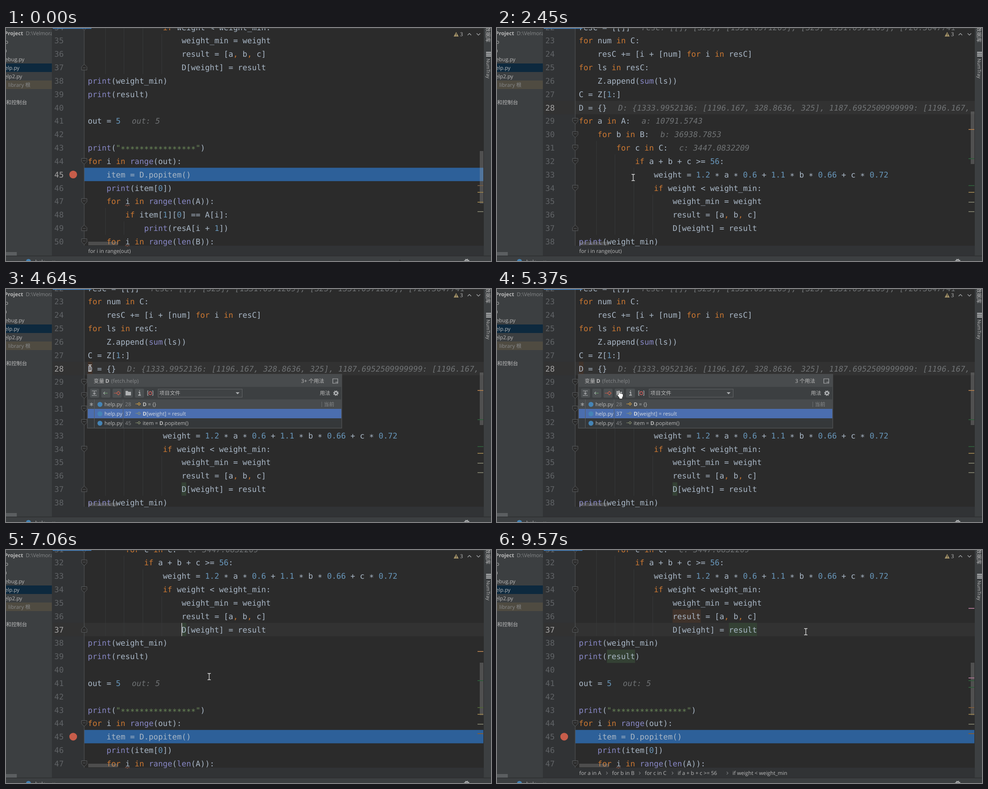
An HTML page that plays this animation: 1079 px wide and 519 px high, repeating every 9640 ms.

```html
<!DOCTYPE html>
<html lang="zh">
<head>
<meta charset="utf-8">
<title>Editor usages</title>
<style>
  html, body { margin: 0; width: 100%; height: 100%; overflow: hidden; background: #2b2b2b; }
  svg { display: block; width: 100vw; height: 100vh; }
  text { white-space: pre; text-rendering: geometricPrecision; }
  .code { font: 17.33px "DejaVu Sans Mono", monospace; fill: #a9b7c6; }
  .ui { font: 11.7px "Open Sans", "Noto Sans CJK SC", "Noto Sans CJK", sans-serif; fill: #bbbbbb; }
  .kw { fill: #cc7832; }
  .fn { fill: #8888c6; }
  .num { fill: #6897bb; }
  .str { fill: #6a8759; }
  .star { baseline-shift: -3px; }
  .hint { fill: #707375; font-style: italic; }
  .dim { fill: #87898b; }
  .on .ui { fill: #d4d8de; }
  .b { font-weight: 700; }
  .end { text-anchor: end; }
  .line { fill: none; stroke: #afb1b3; stroke-width: 1.2; }
</style>
</head>
<body>
<svg id="stage" viewBox="0 0 1079 519" preserveAspectRatio="none"></svg>
<script>
const LOOP = 9640, PITCH = 29.83, CHAR = 10.433, LEFT = 182;

const FIRST_LINE = 22;
const source = `resC = [[]]
for num in C:
    resC += [i + [num] for i in resC]
for ls in resC:
    Z.append(sum(ls))
C = Z[1:]
D = {}
for a in A:
    for b in B:
        for c in C:
            if a + b + c >= 56:
                weight = 1.2 * a * 0.6 + 1.1 * b * 0.66 + c * 0.72
                if weight < weight_min:
                    weight_min = weight
                    result = [a, b, c]
                    D[weight] = result
print(weight_min)
print(result)

out = 5

print("****************")
for i in range(out):
    item = D.popitem()
    print(item[0])
    for i in range(len(A)):
        if item[1][0] == A[i]:
            print(resA[i + 1])
    for i in range(len(B)):`.split('\n');

const hints = {
  22: 'resC: [[], [325], [1331.0971209], [325, 1331.0971209], [726.3647741',
  28: 'D: {1333.9952136: [1196.167, 328.8636, 325], 1187.6952509999999: [1196.167,',
  29: 'a: 10791.5743',
  30: 'b: 36938.7853',
  31: 'c: 3447.0832209',
  41: 'out: 5'
};
const foldStarts = [29, 30, 31, 32, 34, 44, 47, 50], foldEnds = [37, 49];

const rect = (x, y, w, h, fill, more = '') =>
  `<rect x="${x}" y="${y}" width="${w}" height="${h}" fill="${fill}" ${more}/>`;
const ui = (x, cy, str, cls = '') => `<text class="ui ${cls}" x="${x}" y="${cy + 4}">${str}</text>`;
const path = (d, more = '') => `<path class="line" d="${d}" ${more}/>`;
const during = (from, to, body) => `<g data-on="${from} ${to}">${body}</g>`;
const colX = col => LEFT + col * CHAR;
const baseline = mid => Math.round(mid + 6.4);
const indentOf = str => str.search(/\S|$/);
const dot = (x, y) => `<circle cx="${x}" cy="${y}" r="5.5" fill="#4584b6"/>`;
const gear = (x, y) =>
  `<circle cx="${x}" cy="${y}" r="3.4" fill="none" stroke="#afb1b3" stroke-width="2.6"/>
   <circle cx="${x}" cy="${y}" r="5.2" fill="none" stroke="#afb1b3" stroke-width="1.8" stroke-dasharray="2 2.08"/>`;

function paint(str) {
  const token = /("[^"]*")|\b(for|in|if)\b|\b(print|range|len|sum)\b|(\b\d+(?:\.\d+)?)|(,)/g;
  const classes = ['str', 'kw', 'fn', 'num', 'kw'];
  return str.replace(/</g, '&lt;')
    .replace(token, (all, ...groups) =>
      `<tspan class="${classes[groups.slice(0, 5).findIndex(Boolean)]}">${all}</tspan>`)
    .replace(/\*+/g, '<tspan class="star">$&</tspan>');
}

function fold(y, dir) {
  return `<path d="M168 ${y - 6 * dir}h12v${7 * dir}l-6 ${6 * dir}l-6 ${-6 * dir}z" fill="#2b2b2b" stroke="#5c5f61"/>
    <path d="M171 ${y - dir}h6" stroke="#5c5f61"/>`;
}

// A scrolled view of the code, with `top` as the first complete line.
function view(top, current, thumbY, under = '', over = '') {
  const mid = n => 28 + PITCH * (n - top);
  let rows = '', folds = '', text = '';
  if (current !== 45) rows += rect(104, mid(current) - 15, 959, 30, '#323232');
  if (top > 28) {
    rows += rect(174, mid(45) - 15, 888, 29.8, '#2d6099');
    folds += `<circle cx="149.5" cy="${mid(45)}" r="8.6" fill="#c75d4a"/>`;
  }
  for (let n = top - 1; n <= top + 15; n++) {
    const str = source[n - FIRST_LINE];
    if (str === undefined) continue;
    const y = mid(n), base = baseline(y), indent = indentOf(str);
    for (let c = 4; c < indent; c += 4)
      rows += rect(Math.round(colX(c)) - 3, y - 15, 1, 30, '#373839');
    text += `<text class="code" x="107.5" y="${base}" style="fill:${n === current ? '#a4a3a3' : '#606366'}">${n}</text>`;
    text += `<text class="code" x="${colX(indent)}" y="${base}">${paint(str.trim())}</text>`;
    if (hints[n]) text += `<text class="code hint" x="${colX(str.length) + 25}" y="${base}">${hints[n]}</text>`;
    if (n === 47 || n === 50)
      text += `<path d="M265 ${y + 10}l2.5 -2l2.5 3l2.5 -3l2.5 2" fill="none" stroke="#b3674f"/>`;
    if (foldStarts.includes(n)) folds += fold(y, 1);
    if (foldEnds.includes(n)) folds += fold(y, -1);
  }
  return `<g clip-path="url(#editor)">${rows}${under}${rect(173.5, 0, 1, 485, '#555759')}${folds}${over}</g>
    <g clip-path="url(#code)">${text}</g>` +
    rect(1054, thumbY, 8, 117, '#a6a6a6', 'opacity=".3"');
}

const mark = (top, n, col, len, color) =>
  rect(colX(col), 28 + PITCH * (n - top) - 15, len * CHAR, 29.8, color);
const caret = (col, k) => rect(colX(col) - .5, 28 + PITCH * k - 14.5, 1.6, 29, '#bbbbbb');
const ticks = list => list.map(([y, color]) => rect(1049, y - 1, 13, 2, color)).join('');

const READ = '#344134', WRITE = '#40332b';
const TAN = '#8f7a4c', GRAY = '#777766', GREEN = '#2f5a3a', ORANGE = '#a3764b', PINK = '#a4718c';

function sidebar() {
  return rect(0, 0, 102, 507, '#3c3f41') + rect(102, 0, 1, 507, '#323536') +
    rect(0, 79, 102, 19, '#0d293e') + rect(0, 117, 102, 19, '#4f4b41') +
    ui(38, 12, 'Project', 'b end') +
    `<g clip-path="url(#side)">${ui(44, 12, 'D:\\Velmora', 'dim')}</g>` +
    ui(5, 31, 'demo', 'end') + ui(2, 50, 'main', 'end') +
    ui(41, 70, 'debug.py', 'end') + ui(30, 89, 'help.py', 'end') + ui(36, 108, 'help2.py', 'end') +
    ui(5, 127, 'library 根', 'dim') + ui(47, 166, '临时文件和控制台', 'end') +
    rect(0, 499, 24, 8, '#5b5e60');
}

function frame() {
  const grid = [0, 4, 8].map(d => rect(1068, 53 + d, 11, 2.6, '#afb1b3')).join('');
  return rect(1063, 0, 16, 507, '#3c3f41') +
    `<text class="ui end" transform="translate(1068 32) rotate(90)">数据库</text>
     <text class="ui" style="font-size:10.4px" transform="translate(1068.5 68) rotate(90)">NumTray</text>` +
    grid + rect(103, 0, 960, 1, '#3c3f41') + rect(104, 0, 86, 1.6, '#4a88c7') +
    `<path d="M1001.5 9l5.5 10h-11z" fill="#a8966a"/>` +
    rect(1001, 12, 1.3, 3.5, '#2b2b2b') + rect(1001, 16.5, 1.3, 1.3, '#2b2b2b') +
    ui(1010, 14, '3') + path('M1027 16l4 -4l4 4M1047 12l4 4l4 -4', 'stroke-width="1.5"') +
    rect(183, 476, 66, 8, '#a6a6a6', 'opacity=".28"') +
    rect(0, 507, 1079, 12, '#3c3f41') + rect(0, 507, 1079, 1.3, '#2b2d2e') +
    dot(50, 520) + ui(65, 521, 'help') + ui(103, 521, '×') + gear(1025, 520);
}

function crumbs() {
  const parts = [[183, 'for a in A'], [256, 'for b in B'], [329, 'for c in C'],
    [402, 'if a + b + c >= 56'], [524, 'if weight &lt; weight_min']];
  return parts.map(([x, str], i) => ui(x, 497, str) +
    (i ? path(`M${x - 13} 494l3 3l-3 3`, 'style="stroke:#77797b"') : '')).join('');
}

function popup() {
  const button = (x, icon) => rect(x, 222, 20, 20, '#4c5052', 'rx="2"') + icon;
  const row = (i, line, str, color) => {
    const y = 257 + 21 * i;
    return `<g data-row="${i}">` + dot(209, y) + ui(219, y, 'help.py') + rect(260, y - 11, 1, 21, '#5a5d5f') +
      ui(265, y, line, 'dim') +
      path(`M288 ${y - 1}h5m0 0l3 -3l3 3l-3 3z`, `style="stroke:${color}"`) + ui(304, y, str) + '</g>';
  };
  return rect(181, 190, 566, 120, '#3c3f41', 'stroke="#585b5d"') +
    rect(182, 191, 564, 27, '#484b4d') +
    ui(195, 204.5, '变量') + ui(221, 204.5, 'D', 'b') + ui(234, 204.5, '(fetch.help)', 'dim') +
    during(0, 4700, ui(708, 204.5, '3+ 个用法', 'end')) +
    during(4700, LOOP, ui(708, 204.5, '3 个用法', 'end')) +
    path('M727 200h11v10h-11zM733 207.5h5') +
    button(187, path('M191 227h11M191 237h11M196.5 228v6m-3 -2.5l3 3l3 -3')) +
    button(212, path('M217 232h9', 'style="stroke:#6aa06a"') + path('M220 229l-3 3l3 3')) +
    button(237, path('M240 232h6m0 0l4 -4l4 4l-4 4z', 'style="stroke:#d0604c"')) +
    button(262, `<path d="M266 227h5l1 2h6v8h-12z" fill="#afb1b3"/>`) +
    button(287, path('M295 230h2.5v6.5M294 236.5h6M296.5 226.5h1.5', 'style="stroke-width:1.8"')) +
    path('M317 227h-2v10h2M325 227h2v10h-2') +
    `<circle cx="321" cy="232" r="3.4" fill="none" stroke="#c75d5d" stroke-width="1.6"/>` +
    rect(338.5, 223, 187, 18, '#3f4244', 'stroke="#646769"') + ui(341, 232, '项目文件') +
    `<path d="M511 230h8.5l-4.25 4.5z" fill="#afb1b3"/>` +
    ui(698, 232, '用法') + gear(734, 232) +
    rect(182, 246, 564, 63, '#35383a') + rect(182, 246, 564, 21, '#484b4d') +
    '<rect id="selected" x="182" y="267" width="564" height="21" fill="#4b6eaf"/>' +
    rect(196, 246, 1, 63, '#5a5d5f') +
    path('M190 253v8M186.5 255l7 4M193.5 255l-7 4') +
    row(0, 28, '<tspan class="b">D</tspan> = {}', '#d9a343') +
    row(1, 37, '<tspan class="b">D</tspan>[weight] = result', '#8a9272') +
    row(2, 45, 'item = <tspan class="b">D</tspan>.popitem()', '#8a9272') +
    rect(702, 251, 1, 12, '#6a6d6f') + ui(707, 257, '当前', 'dim');
}

const pointers = `<g id="pointer">
  <path data-shape="arrow" d="M0 0v16l4 -4l3 7l3 -1l-3 -7h5z" fill="#fff" stroke="#000"/>
  <path data-shape="beam" d="M-3.5 -7h2.5l1 1l1 -1h2.5M0 -6v12M-3.5 7h2.5l1 -1l1 1h2.5" fill="none" stroke="#e4e4e4" stroke-width="1.3"/>
  <path data-shape="hand" d="M-4 -8.5q1.5 -1.5 3 0v6q1.5 -1 2.5 .4q1.5 -.8 2.5 .6q2 -.5 2.5 1.5v4l-1.5 3v3h-7v-2.5l-4.5 -6q0 -2 2.5 -.8z" fill="#fff" stroke="#111" stroke-width=".9"/>
</g>`;

const stage = document.getElementById('stage');
stage.innerHTML = `<defs>
    <clipPath id="editor">${rect(0, 0, 1063, 485, '#000')}</clipPath>
    <clipPath id="code">${rect(0, 0, 1052, 487, '#000')}</clipPath>
    <clipPath id="side">${rect(0, 0, 102, 500, '#000')}</clipPath>
  </defs>` +
  rect(0, 0, 1079, 519, '#2b2b2b') + rect(103, 0, 71, 485, '#313335') +
  rect(103, 485, 960, 22, '#313335') +
  during(0, 2420,
    view(35, 45, 274) +
    during(1300, 2420,
      `<text class="code" x="${colX(11)}" y="${baseline(28 + PITCH * 10)}" style="fill:#d0c04c">D</text>`) +
    ticks([[351, '#6f5a45'], [366, TAN], [388, TAN], [409, GRAY]])) +
  during(2420, 6980,
    view(23, 28, 186, during(2510, 6980, mark(23, 28, 0, 1, WRITE) + mark(23, 37, 20, 1, READ)),
      during(2510, 3940, caret(0, 5))) +
    ticks([[226, ORANGE], [291, GREEN], [351, GREEN], [366, TAN], [388, GRAY], [409, GRAY]])) +
  during(6980, LOOP,
    view(32, 37, 251,
      during(6980, 8970, mark(32, 37, 20, 1, READ)) +
      during(8970, LOOP, mark(32, 36, 20, 6, WRITE) + mark(32, 37, 32, 6, READ) + mark(32, 39, 6, 6, READ)),
      during(6980, 8970, caret(20, 5)) + during(8970, 9570, caret(38, 5))) +
    during(6980, 8970, ticks([[226, ORANGE], [291, GREEN], [351, '#4e6338']])) +
    during(8970, LOOP, ticks([[130, PINK], [285, PINK], [291, GREEN], [306, GREEN], [351, '#7a5a3c']])) +
    ticks([[366, TAN], [388, GRAY], [409, '#7d5c3b']])) +
  sidebar() + frame() +
  during(0, 2710, ui(183, 497, 'for i in range(out)')) +
  during(7260, LOOP, crumbs()) +
  during(4500, 6980, popup()) + pointers;

// Pointer path: time, x, y and, where it changes, the shape.
const track = [
  [0, 876, 517, 'arrow'], [70, 876, 517], [180, 800, 495, 'beam'], [400, 560, 430], [800, 216, 329],
  [970, 228, 328], [1100, 262, 317], [1300, 297, 326, 'hand'], [1380, 299, 331], [1450, 300, 339],
  [1520, 300, 334], [1710, 300, 334], [1770, 302, 339], [1970, 302, 339], [2030, 303, 344],
  [2419, 303, 344], [2420, 303, 333, 'beam'], [2980, 303, 333], [3500, 196, 180, 'hand'],
  [3600, 194, 182], [3660, 194, 182], [3740, 188, 184], [3940, 188, 184], [4030, 187, 176, 'beam'],
  [4970, 187, 176], [5100, 192, 200, 'hand'], [5910, 437, 304], [5980, 440, 302], [6130, 440, 302],
  [6180, 447, 283], [6839, 447, 283], [6840, 452, 282], [6980, 452, 282, 'beam'], [7260, 452, 282],
  [8160, 641, 170], [8359, 641, 170], [8360, 656, 178], [9569, 656, 178], [9570, 687, 182], [LOOP, 687, 182]
];

function pointerAt(t) {
  let i = 0, shape = '';
  while (i < track.length - 1 && track[i][0] <= t) { shape = track[i][3] || shape; i++; }
  const [t0, x0, y0] = track[i - 1], [t1, x1, y1] = track[i];
  const p = (t - t0) / (t1 - t0);
  return { x: x0 + (x1 - x0) * p, y: y0 + (y1 - y0) * p, shape };
}

const timed = [...stage.querySelectorAll('[data-on]')].map(el => [el, ...el.dataset.on.split(' ').map(Number)]);
const shapes = [...stage.querySelectorAll('[data-shape]')];
const usageRows = [...stage.querySelectorAll('[data-row]')];
const pointer = document.getElementById('pointer');
const selected = document.getElementById('selected');
const start = performance.now();

function render(now) {
  const t = Math.max(0, now - start) % LOOP;
  for (const [el, from, to] of timed) el.style.display = t >= from && t < to ? '' : 'none';
  const { x, y, shape } = pointerAt(t);
  pointer.setAttribute('transform', `translate(${x} ${y})`);
  for (const el of shapes) el.style.display = el.dataset.shape === shape ? '' : 'none';
  const row = y > 246 ? Math.min(2, Math.floor((y - 246) / 21)) : 1;
  selected.setAttribute('y', 246 + 21 * row);
  usageRows.forEach((el, i) => el.classList.toggle('on', i === row));
  requestAnimationFrame(render);
}
render(start);
</script>
</body>
</html>
```
